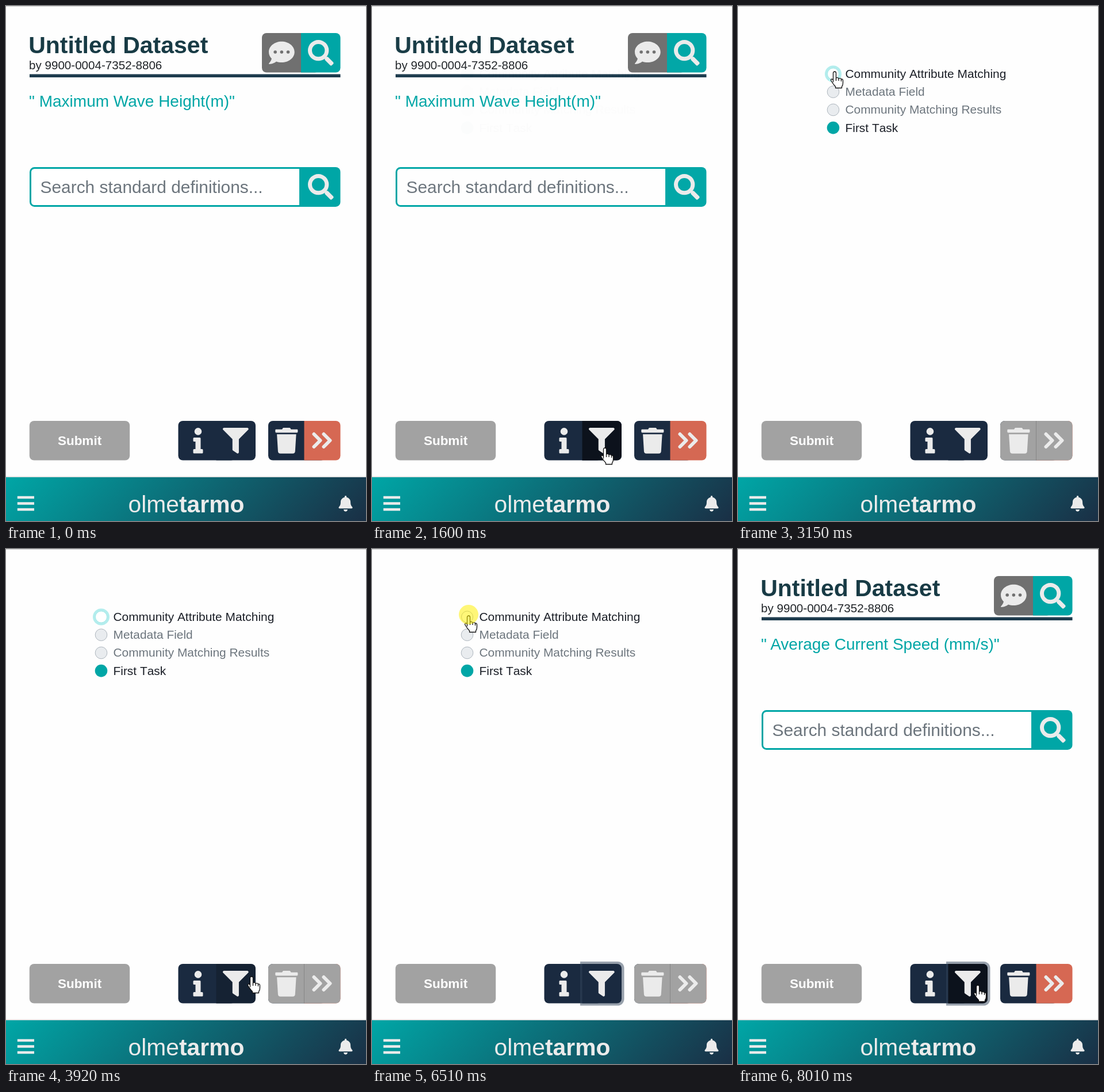
Recreate the animation shown at these times as an HTML page. Size 626 px wide and 895 px high, loop 8.97 s.

```html
<!DOCTYPE html>
<html lang="en">
<head>
<meta charset="utf-8">
<title>Attribute matching</title>
<style>
html, body { margin: 0; width: 100%; height: 100%; overflow: hidden; background: #fefefe; }
svg { display: block; width: 626px; height: 895px; font-family: "Liberation Sans", Arial, sans-serif; }
.bold { font-weight: bold; }
.teal { fill: #00a6a6; }
.navy { fill: #1a2a40; }
.gray { fill: #a2a2a2; }
.pale { fill: #ebebeb; }
.item { font-size: 20.9px; font-kerning: none; fill: #1b1f27; }
.off { fill: #6c757d; }
.offDot { fill: #e9ecef; stroke: #adb5bd; }
.cursor { fill: #fff; stroke: #111; stroke-width: 1.3; stroke-linejoin: round; }
</style>
</head>
<body>
<svg viewBox="0 0 626 895">
  <defs>
    <linearGradient id="bar" gradientUnits="userSpaceOnUse" x1="137.5" y1="681.5" x2="488.5" y2="1032.5">
      <stop stop-color="#00a6a6"/><stop offset="1" stop-color="#1a2f45"/>
    </linearGradient>
    <path id="search" fill-rule="evenodd" d="M505 443L405 343q-7-7-17-7h-16c28-35 44-80 44-128A208 208 0 1 0 208 416c48 0 93-16 128-44v16q0 10 7 17l100 100q17 14 34 0l28-28q14-17 0-34zM208 336a128 128 0 1 1 0-256 128 128 0 0 1 0 256z"/>
    <path id="rightHalf" d="M0 0h60.500a8 8 0 0 1 8 8v52.500a8 8 0 0 1-8 8h-60.500z"/>
  </defs>

  <rect width="626" height="895" fill="#fefefe"/>

  <g id="page">
    <text class="bold" x="39.200" y="82" font-size="41" fill="#183b45">Untitled Dataset</text>
    <text x="40" y="110" font-size="20.600" fill="#212529">by 9900-0004-7352-8806</text>
    <rect x="41" y="118.500" width="540.500" height="5.500" fill="#1d3b4d"/>
    <rect x="445" y="47" width="100" height="68.500" rx="8" fill="#707070"/>
    <use href="#rightHalf" class="teal" x="513" y="47"/>
    <g class="pale" transform="translate(457 59) scale(.0873)">
      <path d="M256 32C115 32 0 125 0 240c0 50 21 95 57 131-12 50-54 95-55 95q-5 9 6 14c66 0 116-32 141-51 33 12 69 19 107 19 141 0 256-93 256-208S397 32 256 32z"/>
      <g fill="#707070"><circle cx="128" cy="240" r="32"/><circle cx="256" cy="240" r="32"/><circle cx="384" cy="240" r="32"/></g>
    </g>
    <use href="#search" class="pale" transform="translate(525 59) scale(.0873)"/>
    <text id="heading" class="teal" x="40" y="175" font-size="28"></text>
    <rect x="42.500" y="281.500" width="500" height="66" rx="7" fill="#fff" stroke="#00a6a6" stroke-width="3"/>
    <use href="#rightHalf" class="teal" transform="translate(510 280) scale(1.043 1.007)"/>
    <use href="#search" class="pale" transform="translate(525 292) scale(.0873)"/>
    <text x="59.500" y="325" font-size="29.900" fill="#6c757d">Search standard definitions...</text>
  </g>

  <g id="cover">
    <rect y="20" width="626" height="600" fill="#fefefe"/>
    <g id="list">
      <circle id="halo" cx="165.500" cy="118" r="14.500" fill="#b3eded"/>
      <circle id="empty" cx="165.500" cy="118" r="10" fill="#fff"/>
      <circle id="check" class="teal" cx="165.500" cy="118" r="10.800"/>
      <circle class="offDot" cx="165.500" cy="149.200" r="10.300"/>
      <circle class="offDot" cx="165.500" cy="180.400" r="10.300"/>
      <circle class="teal" cx="165.500" cy="211.600" r="10.800"/>
      <text class="item" x="186.500" y="125">Community Attribute Matching</text>
      <text class="item off" x="186.500" y="156.200">Metadata Field</text>
      <text class="item off" x="186.500" y="187.400">Community Matching Results</text>
      <text class="item" x="186.500" y="218.600">First Task</text>
    </g>
    <g id="done" class="teal bold" font-size="41.600" text-anchor="middle">
      <circle cx="310.500" cy="128.500" r="32.500"/>
      <path d="M310.500 111v19.500l9.500 7" fill="none" stroke="#fefefe" stroke-width="8.500" stroke-linejoin="round"/>
      <text x="310.500" y="208">All done for now, check back</text>
      <text x="310.500" y="270.500">later...</text>
    </g>
  </g>

  <rect class="gray" x="40.800" y="721" width="174.400" height="68.500" rx="8"/>
  <text class="bold" x="128" y="763" font-size="22.500" fill="#fff" text-anchor="middle">Submit</text>

  <rect class="navy" x="299.500" y="721" width="100" height="68.500" rx="8"/>
  <path id="ring" fill="#35475d" d="M362 717h65a11.500 11.500 0 0 1 11.500 11.500v53.500a11.500 11.500 0 0 1-11.500 11.500h-65z"/>
  <use href="#rightHalf" class="navy" x="365.500" y="721"/>
  <use href="#rightHalf" id="hover" fill="#0c121c" x="365.500" y="721"/>
  <g class="pale">
    <circle cx="334" cy="739.400" r="6.300"/>
    <path d="M327 750h10q1.500 0 1.500 1.500v18.500h2.500q1.500 0 1.500 1.500v4.500q0 1.500-1.500 1.500h-14q-1.500 0-1.500-1.500v-4.500q0-1.500 1.500-1.500h2.500v-13h-2.500q-1.500 0-1.500-1.500v-4q0-1.500 1.500-1.500z"/>
    <path transform="translate(377 733) scale(.0873)" d="M488 0H24C3 0-8 26 7 41l185 185v206q0 12 10 20l80 56c16 11 38 0 38-20V226L505 41C520 26 509 0 488 0z"/>
  </g>

  <rect class="navy" x="456" y="721" width="100" height="68.500" rx="8"/>
  <path fill="#d66853" d="M518.500 721h55a8 8 0 0 1 8 8v52.500a8 8 0 0 1-8 8h-55z"/>
  <g id="disabled">
    <rect class="gray" x="456" y="721" width="125.500" height="68.500" rx="8"/>
    <path d="M518.500 721v68.500" stroke="#868686"/>
  </g>
  <path class="pale" transform="translate(468.300 733) scale(.0873)" d="M432 32H312l-9-19A24 24 0 0 0 281 0H167a24 24 0 0 0-22 13l-9 19H16A16 16 0 0 0 0 48v32a16 16 0 0 0 16 16h416a16 16 0 0 0 16-16V48a16 16 0 0 0-16-16zM53 467a48 48 0 0 0 48 45h246a48 48 0 0 0 48-45L416 128H32z"/>
  <path d="M535.500 744l11 11-11 11M552.500 744l11 11-11 11" fill="none" stroke="#ebebeb" stroke-width="6" stroke-linecap="round" stroke-linejoin="round"/>

  <rect y="817.500" width="626" height="2" fill="#dcdcdc"/>
  <rect y="819" width="626" height="76" fill="url(#bar)"/>
  <path d="M19.800 854h29.200M19.800 864.500h29.200M19.800 875h29.200" stroke="#ebebeb" stroke-width="4.300"/>
  <text class="pale" x="313.500" y="880" font-size="40.800" text-anchor="middle">olme<tspan class="bold">tarmo</tspan></text>
  <path class="pale" transform="translate(578.500 851) scale(.0537)" d="M224 512c35 0 64-29 64-64H160c0 35 29 64 64 64zm215-150c-19-21-55-52-55-154 0-78-54-140-128-155V32a32 32 0 0 0-64 0v21C119 68 64 130 64 208c0 102-36 133-55 154-20 22-5 54 23 54h384c28 0 43-32 23-54z"/>
  <path d="M0 .5h626" stroke="#c8c8c8"/>

  <g id="pointer">
    <path id="arrow" class="cursor" d="M0 0v21l5-4.500 3.200 7.500 3.500-1.500-3.200-7h6.500z"/>
    <g id="hand" class="cursor">
      <path d="M-2.500 18V2.500a2.500 2.500 0 0 1 5 0V11q3-1.500 4.500 1q3-1.200 4.500 1q3-.5 3 3v4q0 4-2 6v2.500h-11v-2.500q-4-4-7.500-10q-1-2 .5-3q1.500-.5 3 2z"/>
      <path fill="none" d="M2.500 11v5M7 12v4M11.500 13v4"/>
    </g>
    <circle id="press" cy="-2" r="17" fill="#fff000" opacity=".53"/>
  </g>
</svg>
<script>
const LOOP = 8970;
const $ = id => document.getElementById(id);
const clamp = v => Math.min(1, Math.max(0, v));
const show = (id, v) => $(id).setAttribute('opacity', v);
// Rises after a and falls after b, each over d ms.
const span = (t, a, b, d = 120) => clamp((t - a) / d) - clamp((t - b) / d);
const within = (t, a, b) => t >= a && t < b;

const route = [
  [860, 510, 168], [1310, 405, 768], [2280, 405, 768], [2520, 181, 166],
  [2650, 168, 98], [2770, 168, 114], [3380, 168, 114], [3920, 427, 743],
  [4010, 422, 757], [5600, 422, 757], [6110, 168, 116], [6720, 168, 116],
  [7260, 428, 732], [7380, 437, 768], [7480, 437, 768], [7570, 417, 758], [LOOP, 417, 758]
];
const presses = [[1540, 1600], [2940, 3010], [4050, 4110], [5410, 5480], [6510, 6590], [7830, 7900]];

function cursorAt(t) {
  const i = Math.max(1, route.findIndex(p => p[0] > t));
  const [t0, x0, y0] = route[i - 1], [t1, x1, y1] = route[i];
  const u = clamp((t - t0) / (t1 - t0)), e = u * u * (3 - 2 * u);
  return [x0 + (x1 - x0) * e, y0 + (y1 - y0) * e];
}

function draw(t) {
  const open = span(t, 1600, 7900, 110);
  const done = span(t, 4110, 5480);
  const checked = 1 - span(t, 3010, 6590);
  $('heading').textContent = t < 7850 ? '" Maximum Wave Height(m)"' : '" Average Current Speed (mm/s)"';
  show('cover', open);
  show('disabled', open);
  show('list', 1 - done);
  show('done', done);
  show('check', checked);
  show('halo', span(t, 2960, 4070) + span(t, 6530, 7850));
  $('empty').setAttribute('stroke', within(t, 4200, 6530) ? '#adb5bd' : '#a6e9e9');

  const focus = span(t, 1600, 2960) + span(t, 4110, 6530) + span(t, 7890, LOOP);
  show('ring', within(t, 5410, 5480) ? 0 : focus / 2);
  show('hover', span(t, 1200, 2300, 110) + span(t, 3880, 5630) + span(t, 7480, LOOP, 90));

  const [x, y] = cursorAt(t);
  const onButton = x > 365 && x < 434 && y > 721;
  const onList = open && x > 150 && x < 470 && y > 90 && y < 232;
  const hand = onButton || onList;
  $('pointer').setAttribute('transform', `translate(${x} ${y})`);
  show('pointer', t < 860 ? 0 : 1);
  show('hand', hand ? 1 : 0);
  show('arrow', hand ? 0 : 1);
  show('press', presses.some(([a, b]) => within(t, a, b)) ? .53 : 0);
}

const start = performance.now();
function tick() {
  draw((performance.now() - start) % LOOP);
  requestAnimationFrame(tick);
}
tick();
</script>
</body>
</html>
```
